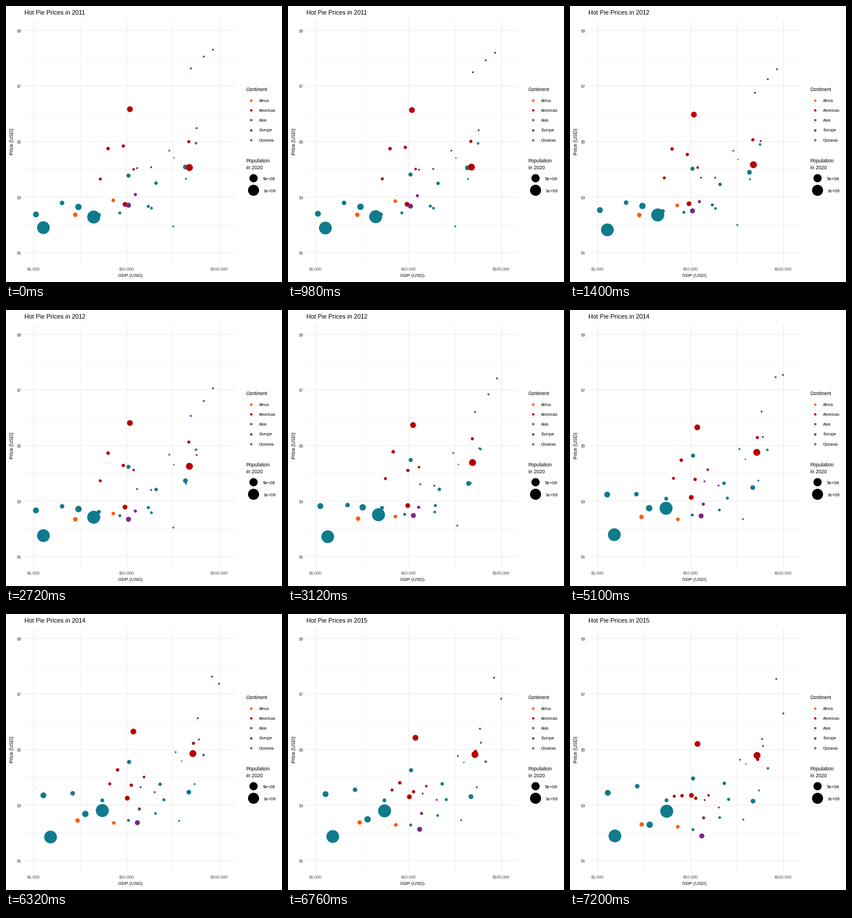
A matplotlib script for the animation above (8 s loop, 480 by 480 pixels).

```python
import numpy as np
import matplotlib.pyplot as plt
from matplotlib.animation import FuncAnimation

SIZE, DPI = 480, 100
PX = 72 / DPI  # points per pixel
INTERVAL, FRAMES = 20, 400
HOLD, MOVE = 900, 900

COLORS = {
    "Africa": "#fb5b08",
    "Americas": "#b60005",
    "Asia": "#0f7b8c",
    "Europe": "#762a87",
    "Oceania": "#438388",
}

plt.rcParams["font.family"] = "Liberation Sans"
fig = plt.figure(figsize=(SIZE / DPI, SIZE / DPI), dpi=DPI, facecolor="white")
ax = fig.add_axes([0, 0, 1, 1])
ax.set_xlim(0, SIZE)
ax.set_ylim(SIZE, 0)
ax.axis("off")


def label(x, y, text, size, color="black", ha="left"):
    """Text whose capitals are centred on y."""
    return ax.text(x, y + 0.36 * size, text, fontsize=size * PX, color=color,
                   ha=ha, va="baseline", parse_math=False)


def dots(x, y, radius, color):
    sizes = (2 * PX * np.asarray(radius)) ** 2
    return ax.scatter(x, y, s=sizes, c=color, linewidths=0, zorder=3, snap=False)


def radius_for(millions):
    return 1.2 + 10.1 * np.sqrt((np.asarray(millions) - 4.8) / 1434)


def grid(xs, ys, width):
    style = dict(color="#ebebeb", lw=width * PX, zorder=1, snap=False)
    ax.vlines(xs, 24, 448, **style)
    ax.hlines(ys, 32, 401, **style)


def draw_axes():
    x_ticks = 48.5 + 161.5 * np.arange(3)
    y_ticks = 42.5 + 96.6 * np.arange(5)
    grid(x_ticks[:-1] + 80.75, y_ticks[:-1] + 48.3, 0.6)
    grid(x_ticks, y_ticks, 1.07)
    for i, x in enumerate(x_ticks):
        label(x, 456.5, f"${10 ** (i + 3):,}", 7.3, "#4d4d4d", "center")
    for i, y in enumerate(y_ticks):
        label(27, y, f"${9 - 2 * i}", 7.6, "#4d4d4d", "right")
    label(216.5, 467.6, "GDP (USD)", 8.2, ha="center")
    ax.text(10.8, 235.5, "Price (USD)", fontsize=8.8 * PX, rotation=90,
            ha="center", va="center")


def draw_legend():
    label(417.5, 145.2, "Continent", 8.6)
    for i, (name, color) in enumerate(COLORS.items()):
        y = 163.7 + 17.28 * i
        dots([426], [y], [2.1], color)
        label(440, y + 0.3, name, 7)
    label(417.5, 269, "Population", 8.8)
    label(417.5, 281, "in 2020", 8.8)
    for y, millions, text in ((299.4, 500, "5e+08"), (320.1, 1000, "1e+09")):
        dots([429.5], [y], [radius_for(millions)], "black")
        label(447, y + 0.6, text, 7.8)


draw_axes()
draw_legend()
title = label(32, 11, "", 10.6)

paths = []


def country(continent, x, growth, y2011, y2013, y2015, millions=8):
    """Key points on the stage; the years between follow shared rules."""
    def price(y):
        return 1 + (429 - y) / 48.3

    # Dear places swing most, and Europe's prices dipped in 2012.
    dip = 6 if continent == "Europe" else 0.7
    y2012 = (y2011 + y2013) / 2 + dip * price(y2011)
    y2014 = (y2013 + y2015) / 2 - 2 * price(y2013)
    xs = x + growth * np.array([0, 0, 0.8, 1, 1.05])
    ys = [y2011, y2012, y2013, y2014, y2015]
    paths.append((xs, ys, millions, COLORS[continent]))


country("Africa", 120.5, 4, 363, 361.5, 366, 102)
country("Africa", 186.5, 1, 338, 365.5, 370, 59)

country("Asia", 65, 12.5, 385.5, 396.5, 386, 1380)
country("Asia", 152.5, 15, 367, 351, 343, 1439)
country("Asia", 126, 12, 349.5, 339.5, 366.5, 274)
country("Asia", 52, 13, 362.5, 332, 311, 221)
country("Asia", 312, 6, 280, 307.5, 325.5, 127)
country("Asia", 97.5, 18.5, 342.5, 336.5, 299.5, 110)
country("Asia", 213, 1, 295, 246.5, 286, 84)
country("Asia", 161.5, 6, 363.5, 336, 324, 70)
country("Asia", 261, 7, 308, 311.5, 294.5, 51)
country("Asia", 247.5, 27, 348.5, 335.5, 322.5, 35)
country("Asia", 198, 15, 360, 352.5, 375, 32)
country("Asia", 253, 7, 351.5, 350, 354, 24)
country("Asia", 284, 11, 251.5, 245.5, 253.5)
country("Asia", 313, 15, 300.5, 299, 307)
country("Asia", 291, 10, 383.5, 371, 357.5)

country("Americas", 215.5, 6, 179.5, 204.5, 226, 213)
country("Americas", 207, 4, 345, 337, 315.5, 129)
country("Americas", 177.5, 16.5, 248, 243.5, 316, 51)
country("Americas", 204, 14, 243.5, 289.5, 320.5, 45)
country("Americas", 318, 8, 236, 217, 253, 38)
country("Americas", 164, 16.5, 301, 288.5, 317, 33)
country("Americas", 222, 18, 284, 267.5, 315.5, 19)
country("Americas", 319, 6, 281, 257.5, 246, 331)

country("Europe", 213, 15.5, 346.5, 349.5, 386, 146)
country("Europe", 225, 7, 328, 335, 354.5, 38)
country("Europe", 252.5, 6, 280.5, 297, 336.5)
country("Europe", 228, 6, 282, 293, 323.5)
country("Europe", 331.5, 4, 212.5, 227, 229.5)
country("Europe", 321.5, 12, 108.5, 169, 217.5)
country("Europe", 344, 14, 88, 133, 113)
country("Europe", 360, 10.5, 76, 98.5, 173)

country("Oceania", 330.5, 13, 238.5, 240.5, 268.5, 25)
country("Oceania", 292, 13.5, 264, 268, 260.5, 5)

xs, ys, people, colors = zip(*paths)
xs, ys = np.array(xs), np.array(ys)
points = dots(xs[:, 0], ys[:, 0], radius_for(people), colors)


def cubic_in_out(p):
    return 4 * p ** 3 if p < 0.5 else 1 - 4 * (1 - p) ** 3


def blend(values, step, p):
    following = min(step + 1, values.shape[1] - 1)
    return values[:, step] * (1 - p) + values[:, following] * p


def update(frame):
    step, elapsed = divmod(frame * INTERVAL, HOLD + MOVE)
    p = max(0, elapsed - HOLD) / MOVE
    x = blend(xs, step, cubic_in_out(p))
    y = blend(ys, step, p)
    points.set_offsets(np.column_stack([x, y]))
    title.set_text(f"Hot Pie Prices in {2011 + step + (p >= 0.5)}")
    return points, title


anim = FuncAnimation(fig, update, frames=FRAMES, interval=INTERVAL,
                     repeat=True, repeat_delay=0, blit=False)
plt.show()
```
